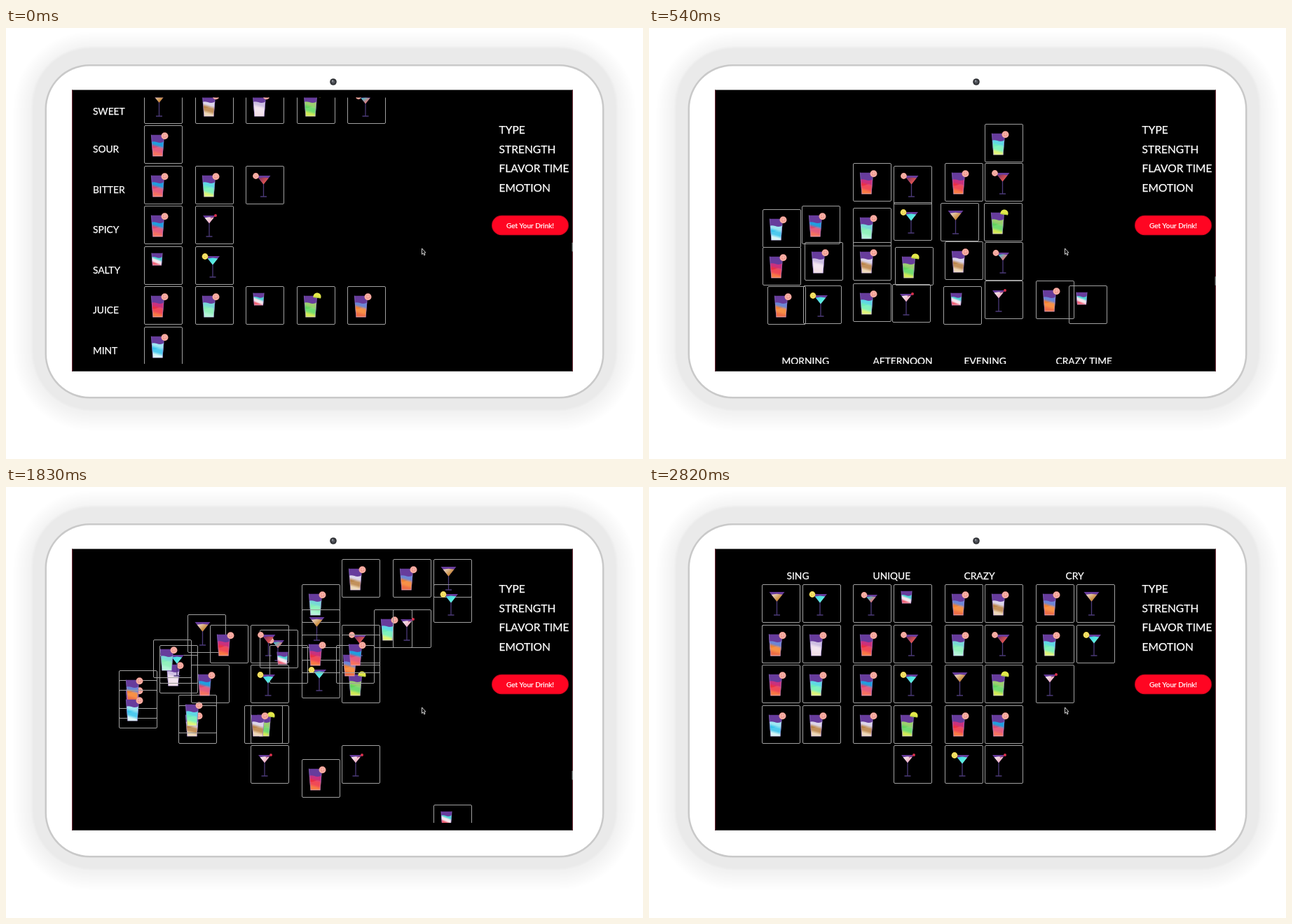
Recreate the animation shown at these times as an HTML page with a canvas. Size 909 by 616 pixels, loop 2850 ms.

```html
<!DOCTYPE html>
<html lang="en">
<head>
<meta charset="utf-8">
<title>Drink picker</title>
<style>
html, body { margin: 0; width: 100%; height: 100%; overflow: hidden; background: #fff; }
canvas { display: block; width: 909px; height: 616px; }
</style>
</head>
<body>
<canvas id="stage"></canvas>
<script>
const W = 909, H = 616, LOOP = 2850;
const FONT = 'Lato, Inter, sans-serif';
const canvas = document.getElementById('stage');
const ctx = canvas.getContext('2d');
const ratio = window.devicePixelRatio || 1;
canvas.width = W * ratio;
canvas.height = H * ratio;

const PURPLE = '#673c9c', STEM = '#4b3a78';
const PINK = ['#f2968c', '#fbd0c6'], LEMON = ['#ecd23e', '#faf3a2'];

// Liquid colours of the tall glasses, top to bottom
const GLASSES = {
  rb: ['#1f9fdf', '#e0466e', '#f6604a'],
  red: ['#c9317f', '#ee3040', '#f8682a'],
  orange: ['#6c86d6', '#f7822c', '#ec5a2c'],
  yg: ['#5fd8e6', '#70f0b4', '#dcf468'],
  mint: ['#78d8d8', '#84f0b4', '#a9f3d2'],
  blue: ['#9fe6f2', '#35c3ec', '#d2f4f4'],
  brown: ['#dcd6ea', '#b98245', '#ecd3b0'],
  white: ['#cdbfe2', '#f1e2ee', '#f0dce4'],
  lime: ['#9ccf70', '#5fd65c', '#cde640']
};

// Martini glasses: centre, rim height, half width, garnish, liquid colours
const MARTINIS = {
  mbr: { x: 21.5, y: 11, w: 11, cols: ['#e6cdb8', '#c98a35'] },
  mr: { x: 25.5, y: 14, w: 10, slice: PINK, cols: ['#8d3560', '#e0554e'] },
  mg: { x: 26, y: 15, w: 9, slice: PINK, cols: ['#4fb7c9', '#e0807c'] },
  mbl: { x: 25, y: 14, w: 10, slice: LEMON, cols: ['#46d9e6', '#5ff0dc'] },
  mw: { x: 20, y: 14, w: 9, cherry: true, cols: ['#f3e3ea', '#f2b5c4'] }
};

// Kind, then column+row in the flavor, time and emotion layouts
const ITEMS = `mbr 00 43 01,brown 10 24 14,white 20 14 12,lime 30 53 53,mg 40 54 21,
rb 01 - -,rb 02 - -,yg 12 25 13,mr 22 32 32,rb 03 13 23,mw 13 35 35,shot 04 75 -,
mbl 14 15 11,red 05 04 03,mint 15 23 02,shot 25 45 31,lime 35 34 34,orange 45 05 02,
blue 06 03 04,yg - 51 62,red - 22 22,red - 42 -,mr - 52 52,mbl - 33 33,brown - 44 24,
mw - 55 55,orange - 65 41,brown - - 51,orange - - 61,mbr - - 71,mbl - - 72,mint - - 42,
mbr - - 43,mw - - 63,mbl - - 45,red - - 44,rb - - 54`
  .split(',').map(line => {
    const [kind, ...slots] = line.trim().split(' ');
    return { kind, spots: slots.map(spot) };
  });

function spot(slot, layout) {
  if (slot === '-') return null;
  const col = +slot[0], row = +slot[1];
  const x = layout === 0
    ? 197 + 72.5 * col
    : 161 + 130.3 * (col >> 1) + 57.7 * (col & 1);
  return { x, y: 81.7 + 57.5 * row };
}

const clamp = (v, lo = 0, hi = 1) => Math.min(hi, Math.max(lo, v));
const mix = (a, b, k) => a + (b - a) * k;

// Scroll thumb position over time, joined by a monotone cubic
const SCROLL = [[0, 313], [360, 349], [540, 361.5], [660, 363.8], [1080, 364], [1500, 380],
  [1620, 387.5], [1830, 412], [2040, 430], [2220, 436], [LOOP, 436]];

const secant = i => (SCROLL[i + 1][1] - SCROLL[i][1]) / (SCROLL[i + 1][0] - SCROLL[i][0]);

function slope(i) {
  if (i === 0) return secant(0);
  if (i === SCROLL.length - 1) return 0;
  const a = secant(i - 1), b = secant(i);
  return a * b > 0 ? 2 * a * b / (a + b) : 0;
}

function scrollAt(t) {
  let i = 0;
  while (i < SCROLL.length - 2 && t >= SCROLL[i + 1][0]) i++;
  const [t0, a] = SCROLL[i], [t1, b] = SCROLL[i + 1];
  const d = t1 - t0, u = (t - t0) / d, v = 1 - u;
  return v * v * (1 + 2 * u) * a + u * u * (3 - 2 * u) * b
    + d * u * v * (v * slope(i) - u * slope(i + 1));
}

function disc(x, y, r, color) {
  ctx.fillStyle = color;
  ctx.beginPath();
  ctx.arc(x, y, r, 0, Math.PI * 2);
  ctx.fill();
}

function panel(x, y, w, h, r, color) {
  ctx.fillStyle = color;
  ctx.beginPath();
  ctx.roundRect(x, y, w, h, r);
  ctx.fill();
}

function polygon(points) {
  ctx.beginPath();
  points.forEach(([x, y]) => ctx.lineTo(x, y));
  ctx.closePath();
}

function line(x0, y0, x1, y1, color, width = 1) {
  ctx.strokeStyle = color;
  ctx.lineWidth = width;
  ctx.beginPath();
  ctx.moveTo(x0, y0);
  ctx.lineTo(x1, y1);
  ctx.stroke();
}

function text(str, x, y, size, align = 'left') {
  ctx.font = `${size}px ${FONT}`;
  ctx.textAlign = align;
  ctx.textBaseline = 'alphabetic';
  ctx.fillStyle = ctx.strokeStyle = '#fff';
  ctx.lineWidth = 0.25;
  ctx.fillText(str, x, y);
  ctx.strokeText(str, x, y);
}

function slice(x, y, r, [flesh, light]) {
  disc(x, y, r, flesh);
  ctx.strokeStyle = light;
  ctx.lineWidth = 0.7;
  ctx.beginPath();
  ctx.arc(x, y, r - 1.2, 0, Math.PI * 2);
  ctx.stroke();
  line(x - r * 0.6, y, x + r * 0.5, y - 1, light, 0.6);
  line(x, y - r * 0.6, x + 0.6, y + r * 0.5, light, 0.6);
}

// Curved surface across a glass, filled down to the bottom
function wave(x, top, w, bottom, swing, fill) {
  ctx.fillStyle = fill;
  ctx.beginPath();
  ctx.moveTo(x, top);
  ctx.bezierCurveTo(x + w * 0.35, top - swing, x + w * 0.6, top + swing * 1.5, x + w, top - swing * 0.4);
  ctx.lineTo(x + w, bottom);
  ctx.lineTo(x, bottom);
  ctx.fill();
}

// Tapered glass with blended liquid
function tumbler(x, y, w, h, taper, cols) {
  ctx.save();
  polygon([[x, y], [x + w, y], [x + w - taper, y + h], [x + taper, y + h]]);
  ctx.clip();
  ctx.fillStyle = PURPLE;
  ctx.fillRect(x, y, w, h);
  const liquid = ctx.createLinearGradient(x + w * 0.65, y + h * 0.35, x + w * 0.35, y + h);
  cols.forEach((color, i) => {
    liquid.addColorStop(i * 0.4, color);
    liquid.addColorStop(i * 0.4 + 0.2, color);
  });
  wave(x, y + h * 0.34, w, y + h, 3, liquid);
  wave(x, y + h * 0.58, w, y + h, -4, 'rgba(255,255,255,.12)');
  ctx.fillStyle = 'rgba(225,215,245,.45)';
  ctx.fillRect(x, y + h - 1.3, w, 1.3);
  ctx.restore();
  line(x + 0.3, y, x + taper + 0.3, y + h, 'rgba(150,125,205,.65)', 0.8);
  line(x + w - 0.3, y, x + w - taper - 0.3, y + h, 'rgba(150,125,205,.65)', 0.8);
}

function martini({ x, y, w, cols, slice: fruit, cherry }) {
  const tip = y + w * 1.25;
  line(x, tip - 2, x, 44, STEM, 1.3);
  line(x - 4.5, 44, x + 4.5, 44, STEM, 1.3);
  polygon([[x - w, y], [x + w, y], [x, tip]]);
  ctx.fillStyle = PURPLE;
  ctx.fill();
  const fill = ctx.createLinearGradient(x - w / 2, y, x + w / 2, tip);
  fill.addColorStop(0.2, cols[0]);
  fill.addColorStop(0.75, cols[1]);
  polygon([[x - w * 0.72, y + w * 0.35], [x, y + w * 0.25], [x + w * 0.72, y + w * 0.35], [x, tip]]);
  ctx.fillStyle = fill;
  ctx.fill();
  if (fruit) slice(x - w - 1, y + 0.5, 4.4, fruit);
  if (cherry) {
    line(x + 2, y + 4, x + w, y, '#a83a5c', 0.8);
    disc(x + w, y, 2, '#d8304c');
  }
}

function drink(kind) {
  if (MARTINIS[kind]) return martini(MARTINIS[kind]);
  if (kind === 'shot') return tumbler(10.5, 9.5, 16, 18, 1.6, ['#4cd3d3', '#f3e4ec', '#ef4a5e']);
  tumbler(10, 13.5, 19, 31, 2.6, GLASSES[kind]);
  if (kind !== 'lime') return slice(29.5, 15.3, 5, PINK);
  ctx.fillStyle = '#e3e84a';
  ctx.beginPath();
  ctx.arc(29, 15, 5.6, Math.PI * 0.95, Math.PI * 2.15);
  ctx.fill();
  line(24.5, 15.5, 33, 16.5, '#8fbf3a', 0.8);
}

function card(kind, x, y) {
  ctx.save();
  ctx.translate(Math.round(x), Math.round(y));
  drink(kind);
  ctx.strokeStyle = '#a0a0a0';
  ctx.lineWidth = 1;
  ctx.beginPath();
  ctx.roundRect(0.5, 0.5, 54, 54, 1.5);
  ctx.stroke();
  ctx.restore();
}

// Cards without a place wait above the view and leave below it
function drawCards(p, q) {
  const second = q > 0, k = second ? q : p;
  for (const { kind, spots } of ITEMS) {
    const a = spots[second ? 1 : 0], b = spots[second ? 2 : 1];
    if (!a && !b) continue;
    const from = a || { x: b.x, y: 43.7 };
    const to = b || { x: a.x, y: second ? 504.5 : 541 };
    card(kind, mix(from.x, to.x, k), mix(from.y, to.y, k));
  }
}

const FLAVORS = ['SWEET', 'SOUR', 'BITTER', 'SPICY', 'SALTY', 'JUICE', 'MINT'];
const TIMES = [['MORNING', 190], ['AFTERNOON', 320], ['EVENING', 450], ['CRAZY TIME', 581]];
const MOODS = [['SING', 197], ['UNIQUE', 320], ['CRAZY', 450], ['CRY', 595]];

function drawLabels(s) {
  const left = 124.5 - (s - 313) * 6;
  if (left > 20) {
    FLAVORS.forEach((name, r) => text(name, left, (r ? 115.9 + 57.5 * r : 119.3) + 5, 13.8));
  }
  const rise = clamp(461 - (s - 364) * 6, 453, 510);
  const timeY = rise + Math.max(0, s - 385.9) * 6;
  if (timeY < 500) TIMES.forEach(([name, x]) => text(name, x - 0.5, timeY + 5, 13.8));
  const moodY = Math.min(127.3, 90 + (s - 423) * 4.5);
  if (moodY > 85) MOODS.forEach(([name, x]) => text(name, x - 0.5, moodY + 5, 13.8));
}

function drawTablet() {
  ctx.fillStyle = '#fff';
  ctx.fillRect(0, 0, W, H);
  for (let d = 46; d > 20; d -= 2) {
    panel(56 - d, 51 - d, 797 + 2 * d, 479 + 2 * d, 64 + d, 'rgba(0,0,0,.0024)');
  }
  for (let d = 20; d > 16; d--) {
    panel(56 - d, 46 - d, 797 + 2 * d, 482 + 2 * d, 64 + d, 'rgba(0,0,0,.0065)');
  }
  panel(55.5, 52, 798, 477.5, 64, '#c9c9c9');
  panel(58, 54.5, 793, 472.5, 61.5, '#fff');
  disc(467, 77, 4.8, '#303236');
  disc(467, 77, 2.6, '#53565d');
  disc(466, 75.6, 1.2, '#9a9ea6');
  ctx.fillStyle = '#000';
  ctx.fillRect(94, 88.5, 715, 402.2);
  line(94.5, 88.5, 94.5, 490.7, '#6a2634');
  line(808.5, 88.5, 808.5, 490.7, '#6a2634');
}

function drawMenu() {
  ['TYPE', 'STRENGTH', 'FLAVOR TIME', 'EMOTION']
    .forEach((name, i) => text(name, 703.5, 151.4 + 27.4 * i, 15.6));
  panel(693, 267.7, 110, 28.6, 14.3, '#b8061c');
  panel(694, 268.7, 108, 26.6, 13.3, '#ff0522');
  text('Get Your Drink!', 748, 286, 10, 'center');
}

function drawCursor() {
  polygon([[593.5, 315], [593.5, 323.5], [595.4, 321.8], [596.7, 324.8], [598, 324.2],
    [596.8, 321.3], [598.8, 321]]);
  ctx.fillStyle = '#000';
  ctx.fill();
  ctx.strokeStyle = '#e8e8e8';
  ctx.lineWidth = 0.9;
  ctx.stroke();
}

function draw(t) {
  const s = scrollAt(t);
  const p = clamp((s - 320.6) / 42), q = clamp((s - 385.9) / 42);
  ctx.setTransform(ratio, 0, 0, ratio, 0, 0);
  drawTablet();

  ctx.save();
  ctx.beginPath();
  ctx.rect(95, 99.5, 713, 380.5);
  ctx.clip();
  drawCards(p, q);
  drawLabels(s);
  ctx.restore();

  drawMenu();
  drawCursor();
  ctx.globalAlpha = 1 - clamp((t - 2550) / 200);
  panel(807.6, s - 6.5, 1.4, 13, 0.7, '#8a8a8a');
  ctx.globalAlpha = 1;
}

function tick() {
  draw(performance.now() % LOOP);
  requestAnimationFrame(tick);
}
tick();
</script>
</body>
</html>
```
